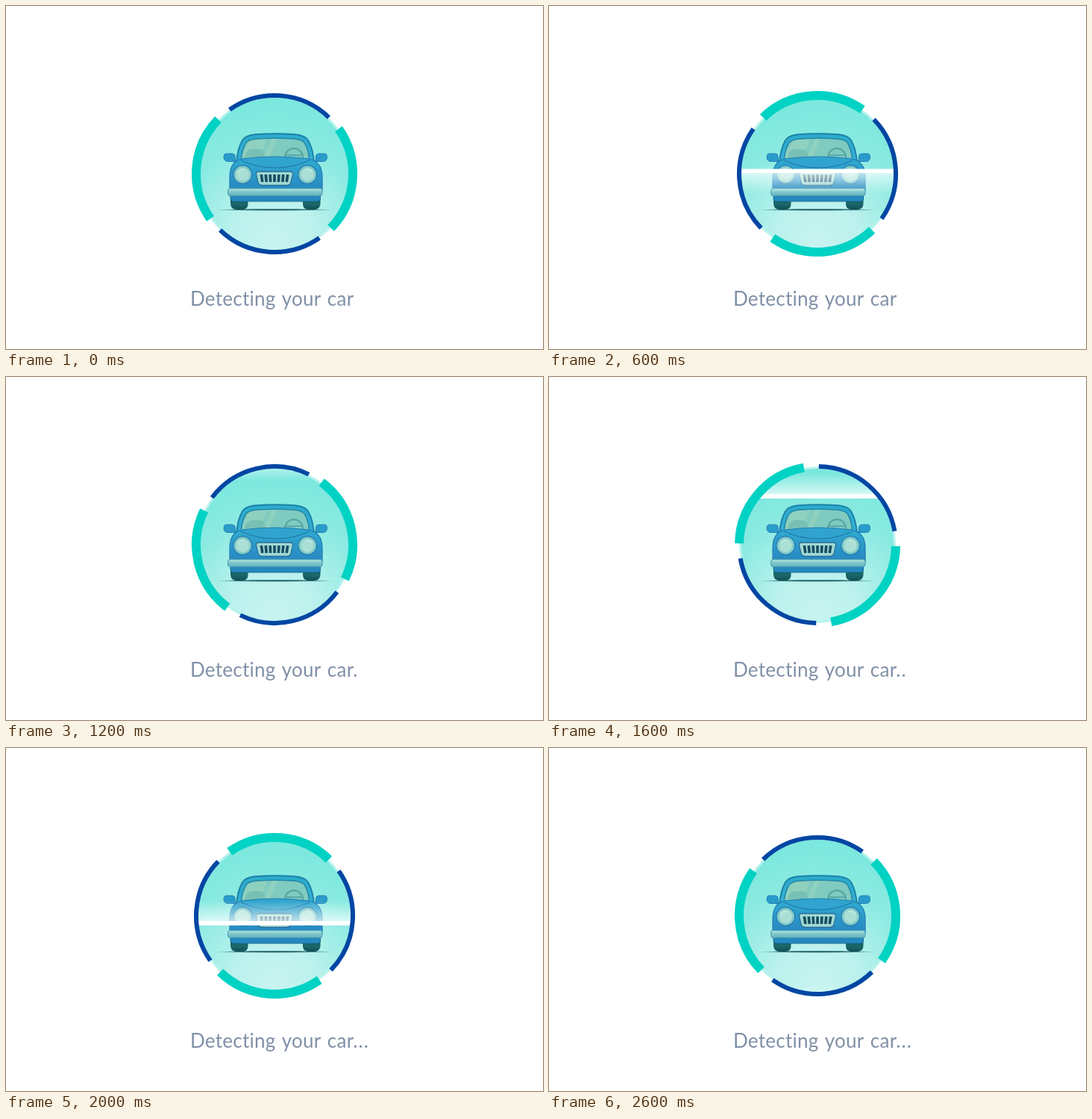
Write an HTML page that moves like this. It is 720 px wide and 460 px high and loops after 2700 ms.

```html
<!DOCTYPE html>
<html lang="en">
<head>
<meta charset="utf-8">
<title>Detecting your car</title>
<style>
  html, body { margin: 0; width: 100%; height: 100%; overflow: hidden; background: #fff; }
  svg { display: block; width: 720px; height: 460px; }
  text { font: 26px Lato, "Open Sans", sans-serif; fill: #8090a7; letter-spacing: .25px; word-spacing: 2px; }
  #dots { letter-spacing: 1.1px; }
</style>
</head>
<body>
<svg viewBox="0 0 720 460">
  <defs>
    <radialGradient id="sky" gradientUnits="userSpaceOnUse" cx="360" cy="314" r="188">
      <stop offset="0" stop-color="#c8f4f1"/>
      <stop offset=".3" stop-color="#bbf1ed"/>
      <stop offset=".7" stop-color="#8aeae1"/>
      <stop offset="1" stop-color="#7be8de"/>
    </radialGradient>
    <linearGradient id="trail" x2="0" y2="1">
      <stop offset="0" stop-color="#f4fefd" stop-opacity=".72"/>
      <stop offset="1" stop-color="#f4fefd" stop-opacity="0"/>
    </linearGradient>
    <linearGradient id="paint" x2="0" y2="1">
      <stop offset="0" stop-color="#30add1"/>
      <stop offset="1" stop-color="#2787c1"/>
    </linearGradient>
    <linearGradient id="roof" x2="0" y2="1">
      <stop offset="0" stop-color="#2aabcb"/>
      <stop offset="1" stop-color="#35b0d5"/>
    </linearGradient>
    <linearGradient id="chrome" x2="0" y2="1">
      <stop offset="0" stop-color="#9bd8d6"/>
      <stop offset=".5" stop-color="#7cc6ca"/>
      <stop offset="1" stop-color="#62b1bb"/>
    </linearGradient>
    <linearGradient id="tyre" x2="0" y2="1">
      <stop offset="0" stop-color="#0c464e"/>
      <stop offset=".55" stop-color="#1c6a6c"/>
      <stop offset="1" stop-color="#0f4f55"/>
    </linearGradient>
    <radialGradient id="shade">
      <stop offset="0" stop-color="#1d5c63"/>
      <stop offset=".65" stop-color="#2a6d73" stop-opacity=".85"/>
      <stop offset="1" stop-color="#3d8588" stop-opacity="0"/>
    </radialGradient>
    <clipPath id="disc"><circle cx="360" cy="225" r="105"/></clipPath>
    <path id="pane" d="M315.500 204 C316.500 195 319 188 321.500 184 Q324 179.500 335 178.300 Q361 176 387 178.300 Q398 179.500 400.500 184 C403 188 405.500 195 406.500 204"/>
    <clipPath id="glass"><use href="#pane"/></clipPath>

    <g id="side">
      <path d="M305 205 L313 210 L311 213 L303 208Z" fill="#2380b5"/>
      <path d="M294.500 198 H303 Q306.500 198 307 201 L307.500 208.500 H297 Q292 208 292 202.500 Q292 198.500 294.500 198Z" fill="#2a9ccb" stroke="#2182b4"/>
      <path d="M301 256 H324.500 V266 Q324 273 317 273 H309 Q302 273 301 266Z" fill="url(#tyre)"/>
    </g>
    <g id="lamp">
      <circle cx="317.300" cy="226" r="13" fill="#2379b0"/>
      <circle cx="317.300" cy="226" r="11.800" fill="#7cc8c8"/>
      <circle cx="317.300" cy="226" r="9.300" fill="#a9dfd5" stroke="#8ccfcb"/>
      <path d="M311 223 A7 7 0 0 1 320 219.500" fill="none" stroke="#bde8dd" stroke-width="2"/>
    </g>
  </defs>

  <g clip-path="url(#disc)">
    <circle cx="360" cy="225" r="105" fill="#b9f3ed"/>
    <circle cx="360" cy="225" r="102" fill="url(#sky)"/>

    <ellipse cx="360" cy="273.300" rx="80" ry="1.500" fill="url(#shade)"/>
    <use href="#side"/>
    <use href="#side" transform="matrix(-1 0 0 1 722.500 0)"/>

    <path d="M309 210 C310 197 313 187 317 180 Q321 173.500 334 172.300 Q361 170 388 172.300 Q401 173.500 405 180 C409 187 412 197 413 210Z" fill="url(#roof)" stroke="#1d82a8" stroke-width="2"/>
    <g clip-path="url(#glass)">
      <path d="M310 170 H412 V210 H310Z" fill="#80cbc0"/>
      <path d="M310 210 L333 170 H354 L337 210Z M343 210 L360 170 H367 L350 210Z" fill="#8fd1bf"/>
      <path d="M320 204 Q321 193 329 192 H341 Q347 193 348 204Z" fill="#79c0b4"/>
      <circle cx="386" cy="203" r="12" fill="none" stroke="#58a9a6" stroke-width="2.500"/>
      <path d="M375 200 H397" stroke="#58a9a6" stroke-width="2"/>
    </g>
    <use href="#pane" fill="none" stroke="#2486a6" stroke-width="1.500"/>

    <path d="M301 250 H421.500 V258 Q421.500 262 417 262 H306 Q301 262 301 258Z" fill="#2589bd" stroke="#1a6b98"/>
    <path d="M300 248 V229 C300 215 305 207 317 205 Q361 199 405 205 C418 207 424 215 424 229 V248Z" fill="url(#paint)" stroke="#2079b2" stroke-width="1.200"/>
    <path d="M317 206 Q361 200 405 206 Q385 216 361 216 Q337 216 317 206Z" fill="#30a4ce"/>
    <path d="M315 207 Q337 217 361 217 Q385 217 407 207" fill="none" stroke="#2078ad" stroke-width="1.200"/>
    <use href="#lamp"/>
    <use href="#lamp" transform="matrix(-1 0 0 1 721.500 0)"/>

    <path d="M339 222 H381 Q385 222 384.500 226 L382 236.500 Q381 240.500 376 240.500 H344 Q339 240.500 338 236.500 L335.500 226 Q335 222 339 222Z" fill="#9fd9d2" stroke="#286f99" stroke-width="1.300"/>
    <g id="bars" stroke="#174b62" stroke-width="3.600"/>

    <rect x="297.500" y="244.500" width="126.500" height="10" rx="3" fill="url(#chrome)" stroke="#4798b2"/>
    <path d="M300 247 H422" stroke="#aee0dc"/>

    <g id="scan">
      <rect x="250" y="3" width="220" height="27" fill="url(#trail)"/>
      <rect x="250" y="-3" width="220" height="6" fill="#fff"/>
    </g>
  </g>

  <g id="ring" fill="none" stroke-dasharray="79 101">
    <circle r="105" pathLength="360" stroke="#00d2c3" stroke-width="12" transform="rotate(-39.500)"/>
    <circle r="105" pathLength="360" stroke="#0046a3" stroke-width="6" transform="rotate(50.500)"/>
  </g>

  <text x="247" y="402">Detecting your car</text>
  <text id="dots" x="465.300" y="402"></text>
</svg>
<script>
  const $ = id => document.getElementById(id);
  const STEP = 100, STEPS = 27;
  const SPIN = 13.5, SPEED = 18.75;
  const dotSteps = [7, 14, 20];

  for (let i = -3; i <= 3; i++) {
    const bar = document.createElementNS("http://www.w3.org/2000/svg", "path");
    bar.setAttribute("d", `M${360 + i * 5.9} 226 L${360 + i * 5.4} 236`);
    $("bars").append(bar);
  }

  function draw(n) {
    $("ring").setAttribute("transform", `translate(360 225) rotate(${4.5 + SPIN * n})`);
    // The scan line rises first, then comes back down with its trail flipped.
    const up = n <= 12;
    const y = up ? 334 - SPEED * n : 160 + SPEED * (n - 16);
    $("scan").setAttribute("transform", `translate(0 ${y}) scale(1 ${up ? 1 : -1})`);
    $("dots").textContent = ".".repeat(dotSteps.filter(s => n >= s).length);
  }

  function tick() {
    draw(Math.floor(performance.now() / STEP) % STEPS);
    requestAnimationFrame(tick);
  }
  tick();
</script>
</body>
</html>
```
